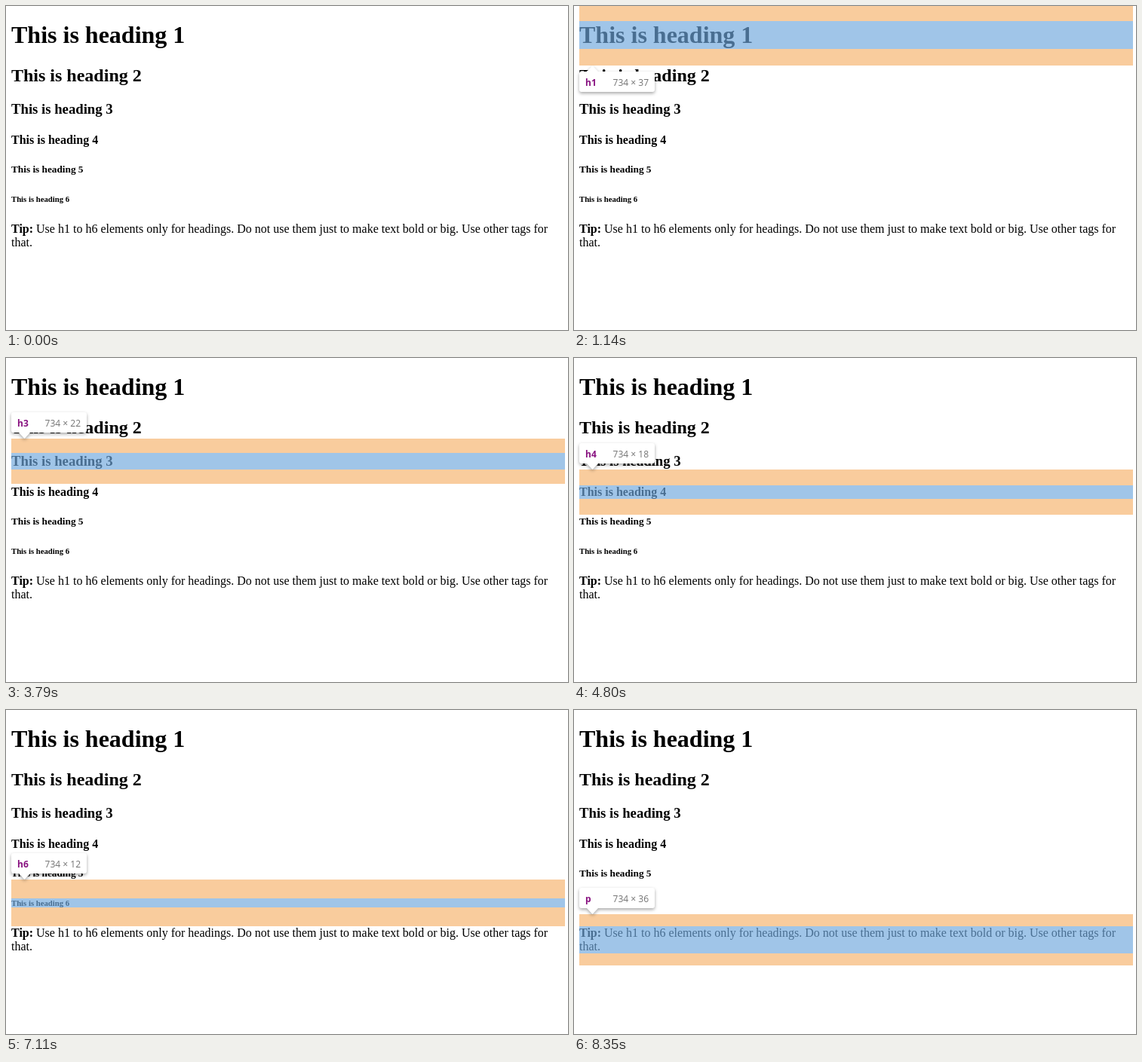
An HTML page with a canvas that plays this animation: 745x430 px, repeating every 9.44 s.

```html
<!DOCTYPE html>
<html lang="en">
<head>
<meta charset="utf-8">
<title>Heading inspector</title>
<style>
  html, body { margin: 0; width: 100%; height: 100%; overflow: hidden; background: #fff; }
  canvas { display: block; }
</style>
</head>
<body>
<canvas id="stage" width="745" height="430"></canvas>
<script>
const ctx = document.getElementById('stage').getContext('2d');
const LOOP = 9440;
const LEFT = 7, WIDTH = 734;
const SERIF = '"Liberation Serif", "Times New Roman", serif';
const SANS = '"Open Sans", "Noto Sans", sans-serif';

const headings = [
  { size: 32, base: 49 },
  { size: 24, base: 100 },
  { size: 18.72, base: 143 },
  { size: 16, base: 183 },
  { size: 13.28, base: 221 },
  { size: 10.72, base: 260 }
];

// Each inspected element: start time, content top and height, outer margin edges
const inspected = [
  { at: 1140, tag: 'h1', top: 20, height: 37, from: 0, to: 79 },
  { at: 2610, tag: 'h2', top: 79, height: 27, from: 59, to: 126 },
  { at: 3790, tag: 'h3', top: 126, height: 22, from: 107, to: 167 },
  { at: 4800, tag: 'h4', top: 169, height: 18, from: 148, to: 208 },
  { at: 5950, tag: 'h5', top: 209, height: 16, from: 187, to: 247 },
  { at: 7110, tag: 'h6', top: 250, height: 12, from: 225, to: 287 },
  { at: 8350, tag: 'p', top: 287, height: 36, from: 271, to: 339 }
];

function text(str, x, y, font, color = '#000', align = 'left') {
  ctx.font = font;
  ctx.fillStyle = color;
  ctx.textAlign = align;
  ctx.fillText(str, x, y);
}

function drawPage() {
  ctx.fillStyle = '#fff';
  ctx.fillRect(0, 0, 745, 430);
  headings.forEach((h, i) =>
    text('This is heading ' + (i + 1), LEFT, h.base, `bold ${h.size}px ${SERIF}`));

  const bold = `bold 16px ${SERIF}`, plain = `16px ${SERIF}`;
  text('Tip:', LEFT, 301, bold);
  const indent = ctx.measureText('Tip:').width;
  text(' Use h1 to h6 elements only for headings. Do not use them just to make text bold or big. Use other tags for',
    LEFT + indent, 301, plain);
  text('that.', LEFT, 319, plain);
}

function band(from, to, color) {
  ctx.fillStyle = color;
  ctx.fillRect(LEFT, from, WIDTH, to - from);
}

function drawHighlight({ top, height, from, to }) {
  const margin = 'rgba(246, 178, 107, 0.66)';
  band(from, top, margin);
  band(top, top + height, 'rgba(111, 168, 220, 0.66)');
  band(top + height, to, margin);
}

function drawTooltip({ tag, height, from, to }) {
  const below = from < 35;
  const y = below ? to + 8 : from - 35;
  const tip = below ? to : from;
  const edge = below ? y : y + 27;

  const shape = new Path2D();
  shape.roundRect(LEFT, y, 100, 27, 3);
  const arrow = [[17, edge], [24.5, tip], [32, edge]];
  if (!below) arrow.reverse();
  arrow.forEach(([px, py], i) => i ? shape.lineTo(px, py) : shape.moveTo(px, py));
  shape.closePath();

  ctx.save();
  ctx.shadowColor = 'rgba(0, 0, 0, 0.35)';
  ctx.shadowBlur = 4;
  ctx.shadowOffsetY = 2;
  ctx.fillStyle = '#fff';
  ctx.fill(shape);
  ctx.restore();

  text(tag, 15, y + 19, `bold 12px ${SANS}`, '#881280');
  text(`${WIDTH} × ${height}`, 99, y + 19, `12px ${SANS}`, '#737373', 'right');
}

function frame() {
  const t = performance.now() % LOOP;
  const current = inspected.filter(e => e.at <= t).pop();
  drawPage();
  if (current) {
    drawHighlight(current);
    drawTooltip(current);
  }
  requestAnimationFrame(frame);
}
frame();
</script>
</body>
</html>
```
